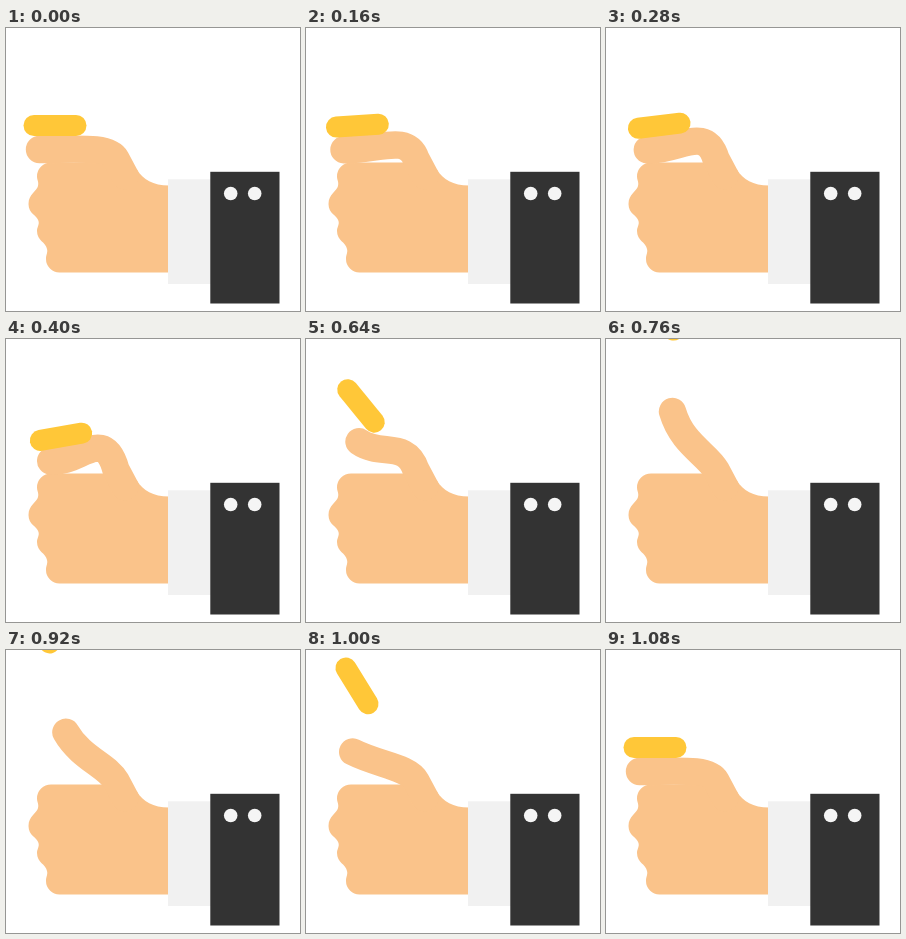
Animation, 294 px wide and 283 px high, one loop 2400 ms. Source, as an HTML page:

```html
<!DOCTYPE html>
<html lang="en">
<head>
<meta charset="utf-8">
<title>Coin flip</title>
<style>
  html, body { margin: 0; width: 100%; height: 100%; overflow: hidden; background: #fff; }
  svg { display: block; width: 100%; height: 100%; }
</style>
</head>
<body>
<svg viewBox="0 0 294 283">
  <path fill="#fac38a" d="M45 134.5a14 14 0 0 0-14 14c0 4 2 5 1 9.5-1 5-9.5 8-9.5 18
    0 10 8.5 11 10 17 1 4-1.5 6-1.5 10 0 10 9 11 10 18 1 4-1 5-1 10a13.5 13.5 0 0 0 13.5 13.5
    H163V157.5C147 157.5 137 152 131 141.6L110 134.5Z"/>
  <path id="thumb" fill="none" stroke="#fac38a" stroke-width="27.4"
    stroke-linecap="round" stroke-linejoin="round"/>
  <rect x="162" y="151.3" width="43" height="104.7" fill="#f1f1f1"/>
  <rect x="204.3" y="143.8" width="69.2" height="131.7" fill="#333"/>
  <g fill="#f5f5f5">
    <circle cx="224.7" cy="165.5" r="6.8"/>
    <circle cx="248.7" cy="165.5" r="6.8"/>
  </g>
  <rect id="coin" x="-31.5" y="-10.5" width="63" height="21" rx="10.5" fill="#ffc738"/>
</svg>
<script>
  const STEP_MS = 40, LOOP_STEPS = 60;
  const thumb = document.getElementById('thumb');
  const coin = document.getElementById('coin');

  // Thumb poses: tip and the two control points of its centre line; the base is fixed.
  const rest = [33.5, 121.5, 70, 121.5, 103, 118];
  const cocked = [44.7, 122, 73, 125, 98, 86];
  const flick = [53, 102.7, 75, 118, 100, 101];
  const up = [66.5, 72.5, 76, 105, 101, 115];
  const thumbKeys = [[0, rest], [10, cocked], [15, cocked], [16, flick], [18, up],
    [22, up], [27, rest], [LOOP_STEPS, rest]];

  // Coin poses: x, y, angle. Two full turns in the air bring it back flat.
  const tilted = [55, 97.8, -10], landed = [49, 97.5, 720];
  const coinKeys = [[0, [49, 97.5, 0]], [10, tilted], [15, tilted], [21, [55, -87.5, 355]],
    [27, landed], [LOOP_STEPS, landed]];

  function poseAt(keys, step) {
    const next = keys.findIndex(([at]) => at > step);
    const [start, from] = keys[next - 1], [end, to] = keys[next];
    const mix = (step - start) / (end - start);
    return from.map((value, i) => value + (to[i] - value) * mix);
  }

  function draw(time) {
    const step = Math.floor(time / STEP_MS) % LOOP_STEPS;
    const [tipX, tipY, ...bend] = poseAt(thumbKeys, step);
    thumb.setAttribute('d', `M${tipX} ${tipY}C${bend} 110 131L119 148`);
    const [x, y, angle] = poseAt(coinKeys, step);
    coin.setAttribute('transform', `translate(${x} ${y}) rotate(${angle})`);
  }

  const startTime = performance.now();
  function tick() {
    draw(performance.now() - startTime);
    requestAnimationFrame(tick);
  }
  tick();
</script>
</body>
</html>
```
